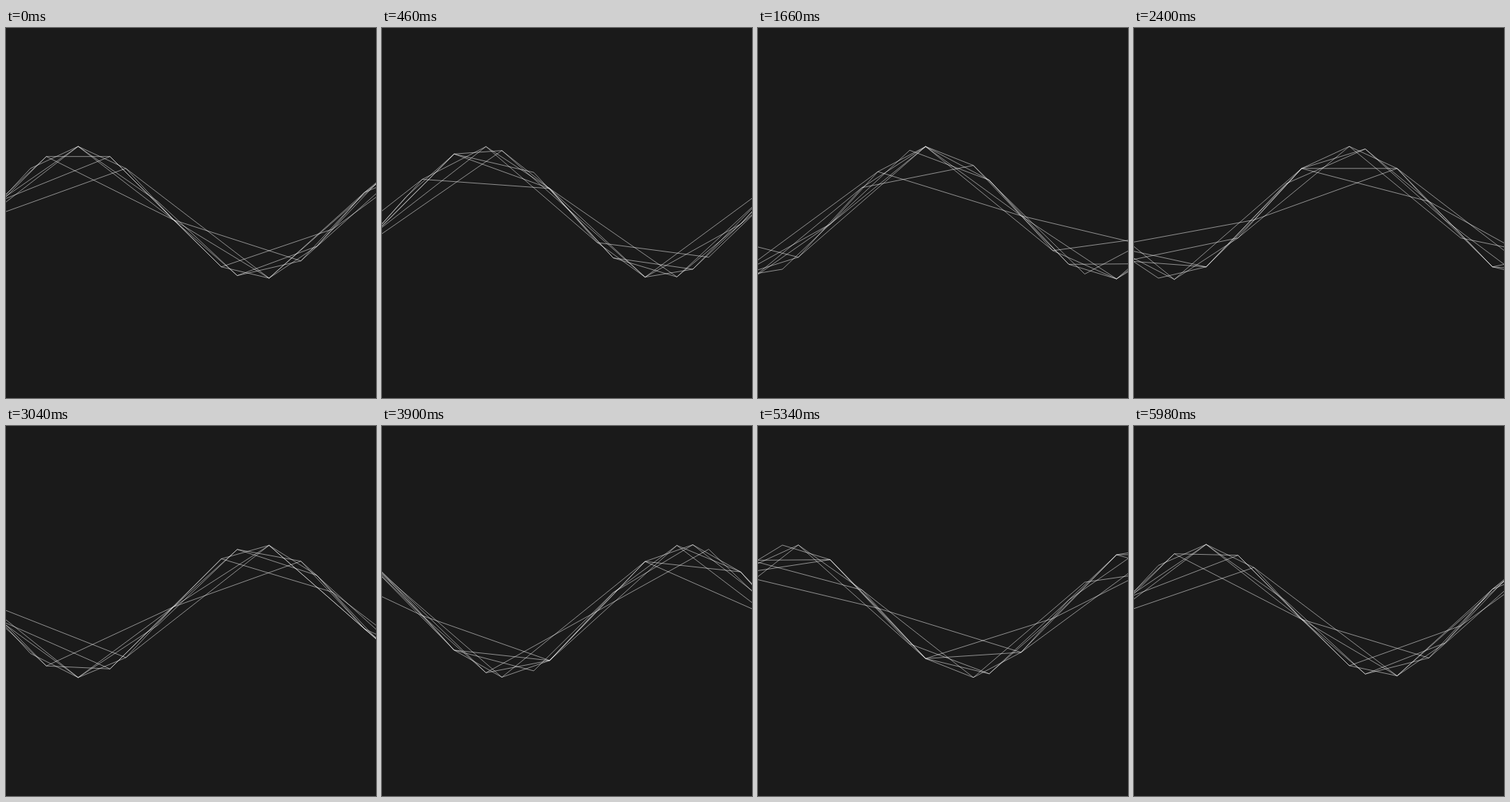
An HTML page with a canvas for the animation above (6000 ms loop, 500 by 500 pixels).

```html
<!DOCTYPE html>
<html lang="en">
<head>
<meta charset="utf-8">
<title>Sine chords</title>
<style>
  html, body { margin: 0; width: 100%; height: 100%; overflow: hidden; background: #1a1a1a; }
  canvas { display: block; width: 500px; height: 500px; }
</style>
</head>
<body>
<canvas id="stage" width="500" height="500"></canvas>
<script>
  const ctx = document.getElementById('stage').getContext('2d');
  const SIZE = 500, LOOP = 6000, TICK = 20;
  const MID = 250, AMP = 90;
  const PEAK_X = 97.5, GAP = 21.5;      // wave crest at time 0, distance between grid points
  const TURN = 16 * Math.PI / 180;      // wave angle per grid point
  const ANCHOR = 30;                    // grid point shared by every chain
  const STRIDES = [3, 4, 5, 6, 7, 8, 9];

  const px = i => PEAK_X + i * GAP;
  const py = (i, phase) => MID - AMP * Math.cos(i * TURN - phase);

  // Joins every stride-th grid point of the wave with straight lines.
  function chain(stride, phase) {
    let i = ANCHOR;
    ctx.beginPath();
    ctx.moveTo(px(i), py(i, phase));
    while (px(i) > 0) {
      i -= stride;
      ctx.lineTo(px(i), py(i, phase));
    }
    ctx.stroke();
  }

  function draw(time) {
    const phase = Math.floor(time % LOOP / TICK) * TICK / LOOP * 2 * Math.PI;
    ctx.fillStyle = '#1a1a1a';
    ctx.fillRect(0, 0, SIZE, SIZE);
    ctx.lineWidth = 1;
    ctx.strokeStyle = 'rgba(255, 255, 255, 0.5)';
    STRIDES.forEach(stride => chain(stride, phase));
  }

  function loop() {
    draw(performance.now());
    requestAnimationFrame(loop);
  }
  loop();
</script>
</body>
</html>
```
